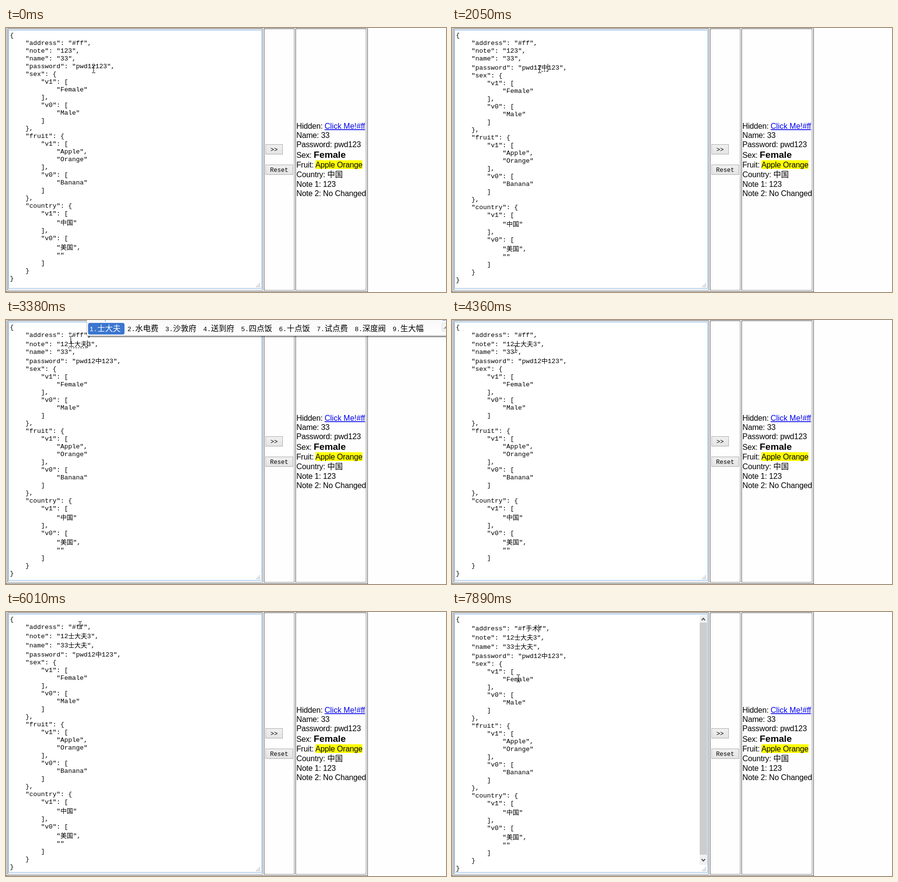
These frames come from a looping animation (906x545 px, 8 s). An HTML page:

```html
<!DOCTYPE html>
<html lang="en">
<head>
<meta charset="utf-8">
<title>JSON form editor</title>
<style>
  html, body { margin: 0; width: 100%; height: 100%; overflow: hidden; background: #fefefe; }
  svg { display: block; }
  text { white-space: pre; }
  .code { font: 13.333px "Liberation Mono", "Noto Sans CJK SC", monospace; }
  .wide { font-size: 13px; }
  .button { font: 12.5px "Liberation Mono", monospace; }
  .page { font: 16px "Liberation Sans", "Noto Sans CJK SC", sans-serif; letter-spacing: -.15px; }
  .large { font-size: 19.2px; font-weight: bold; letter-spacing: 0; }
  .link { fill: #00e; text-decoration: underline 1px; letter-spacing: 0; }
  .typed { font: bold 16px "Liberation Sans", sans-serif; }
  .word { font: 16px "Noto Sans CJK SC", sans-serif; }
</style>
</head>
<body>
<svg id="stage" width="906" height="545" viewBox="0 0 906 545">
  <defs>
    <linearGradient id="panel" x2="0" y2="1">
      <stop stop-color="#f5f5f5"/><stop offset="1" stop-color="#fff"/>
    </linearGradient>
    <linearGradient id="face" x2="0" y2="1">
      <stop stop-color="#f0f0f0"/><stop offset="1" stop-color="#e4e4e4"/>
    </linearGradient>
    <filter id="shadow" x="-5%" y="-20%" width="110%" height="150%">
      <feDropShadow dx="2" dy="2" stdDeviation="1" flood-opacity=".55"/>
    </filter>
  </defs>
  <g id="layout"></g>
  <g id="live"></g>
</svg>
<script>
const LOOP = 8000, BLINK = 560, CHAR = 8, WIDE = 13, LEFT = 8;
const DARK = '#4c4c4c', LIGHT = '#808080';

const SOURCE = `{
    "address": "#ff",
    "note": "123",
    "name": "33",
    "password": "pwd12123",
    "sex": {
        "v1": [
            "Female"
        ],
        "v0": [
            "Male"
        ]
    },
    "fruit": {
        "v1": [
            "Apple",
            "Orange"
        ],
        "v0": [
            "Banana"
        ]
    },
    "country": {
        "v1": [
            "中国"
        ],
        "v0": [
            "美国",
            ""
        ]
    }
}`.split('\n');

const S = '是 上 说 三 四 岁 时 手 少';
const SD = '速度 时代 收到 受到 感到 首都 视点 深度 山东';
const SDF = '士大夫 水电费 沙敦府 送到府 四点饭 十点饭 试点费 深度阀 生大幅';

// Each session types words through the input method at one place in the text.
const sessions = [
  { line: 4, col: 22, end: 2050, steps: [
    [1340, 'zh', '在 中 做 值 找 再 最 这 子'],
    [1490, 'zho', '中 中国 周 中午 中心 州 种 中文 重点'],
    [1620, 'zhong', '中 种 重 众 终 钟 忠 肿 仲']] },
  { line: 2, col: 15, end: 3790, steps: [[3110, 's', S], [3250, 'sd', SD], [3380, 'sdf', SDF]] },
  { line: 3, col: 15, end: 5320, steps: [[4590, 's', S], [4730, 'sd', SD], [4880, 'sdf', SDF]] },
  { line: 1, col: 18, end: 6770, steps: [
    [6290, 's', S],
    [6430, 'ss', '手术 实施 搜索 上述 叔叔 试试 时尚 设施 双手']] },
];

// start, end, steps, x, y
const moves = [
  [2050, 2990, 6, 133, 41],
  [3790, 4420, 4, 129, 64],
  [5320, 6010, 5, 152, 27],
  [6770, 7230, 3, 189, 161],
  [7230, 7890, 5, 136, 137],
];

const rect = (x, y, w, h, fill, extra = '') =>
  `<rect x="${x}" y="${y}" width="${w}" height="${h}" fill="${fill}" ${extra}/>`;
const text = (x, y, cls, str, extra = '') =>
  `<text x="${x}" y="${y}" class="${cls}" ${extra}>${str}</text>`;
const path = (d, stroke, width, extra = '') =>
  `<path d="${d}" fill="none" stroke="${stroke}" stroke-width="${width}" ${extra}/>`;
const codeLine = (y, str) =>
  text(LEFT, y, 'code', str.replace(/[^\x00-\x7f]+/g, '<tspan class="wide">$&</tspan>'));

const ruler = document.createElement('canvas').getContext('2d');
ruler.font = 'bold 16px "Liberation Sans", sans-serif';

function cell(left, right) {
  const w = right - left + 1;
  return rect(left, 541, w, 1, LIGHT) + rect(right, 1, 1, 541, LIGHT) +
    rect(left, 1, w, 1, DARK) + rect(left, 1, 1, 541, DARK);
}

function button(x, y, w, label) {
  return rect(x + .5, y + .5, w - 1, 20, 'url(#face)', 'stroke="#adadad"') +
    text(x + w / 2, y + 15, 'button', label, 'text-anchor="middle"');
}

function drawLayout() {
  let grip = '';
  for (let row = 0; row < 3; row++)
    for (let i = 0; i <= row; i++) grip += rect(521 - i * 3, 527 + row * 3, 2, 2, '#bcbcbc');
  const labels = [
    [208, 'Hidden: '], [227, 'Name: 33'], [246, 'Password: pwd123'], [268, 'Sex: '],
    [288, 'Fruit: '], [308, 'Country: 中国'], [328, 'Note 1: 123'], [347, 'Note 2: No Changed'],
  ];
  return rect(0, 0, 1, 545, LIGHT) + rect(744, 0, 1, 545, DARK) + rect(0, 544, 745, 1, DARK) +
    cell(3, 528) + cell(531, 593) + cell(596, 741) +
    rect(5.5, 4.5, 521, 533, '#fff', 'stroke="#7ab1e6"') + grip +
    button(534, 240, 36, '&gt;&gt;') + button(534, 282, 57, 'Reset') +
    rect(637, 273, 97, 18, '#ff0') +
    labels.map(([y, str]) => text(598, y, 'page', str)).join('') +
    text(656, 208, 'page link', 'Click Me!#ff') +
    text(633.5, 268, 'page large', 'Female') +
    text(637, 288, 'page', 'Apple Orange');
}

function drawPopup(x, y, typed, words) {
  const spacing = typed.startsWith('zh') ? 0 : 2;
  const typedEnd = x + 8 + ruler.measureText(typed).width + spacing * typed.length;
  let items = '', at = x + 6;
  words.forEach((word, i) => {
    const width = 16 + 16 * word.length, fill = `fill="${i ? '#000' : '#fff'}"`;
    if (!i) items += rect(at - 3, y + 24, width + 11, 24, '#3b76cf', 'rx="4"');
    items += text(at, y + 41, 'code', `${i + 1}.`, fill) + text(at + 16, y + 41, 'word', word, fill);
    at += width + 14;
  });
  const right = at + 72;
  const arrow = (left, dir, color) => {
    const cx = left + 11, cy = y + 33;
    return rect(left + .5, y + 24.5, 21, 17, '#f3f3f3', 'stroke="#ddd" rx="2"') +
      `<path d="M${cx - 8} ${cy - 4 * dir}L${cx} ${cy + 4 * dir}L${cx + 8} ${cy - 4 * dir}L${cx} ${cy - dir}Z" fill="${color}"/>`;
  };
  return rect(x + .5, y + .5, right - x - 2, 50, 'url(#panel)', 'stroke="#c4c4c4" filter="url(#shadow)"') +
    text(x + 8, y + 18, 'typed', typed, `letter-spacing="${spacing}"`) +
    rect(Math.round(typedEnd), y + 3, 1, 19, '#5a9bd0') +
    `<circle cx="${right - 44}" cy="${y + 11}" r="8" fill="#3b6fd8"/>` + items +
    arrow(right - 49, -1, '#8a8a8a') + arrow(right - 26, 1, '#2468cf');
}

function drawScrollbar() {
  return rect(510, 6, 16, 516, '#f0f0f0') + rect(510, 22, 15, 479, '#cdcdcd') +
    path('M514 17l3.5-4 3.5 4M514 510l3.5 4 3.5-4', '#505050', 2);
}

function drawMouse(t) {
  let x = 180, y = 85;
  for (const [start, end, steps, toX, toY] of moves) {
    if (t < start) break;
    const p = Math.min(1, Math.floor((t - start) / (end - start) * steps + 1e-6) / steps);
    const ease = p * p * (3 - 2 * p);
    x += (toX - x) * ease;
    y += (toY - y) * ease;
  }
  x = Math.round(x);
  y = Math.round(y);
  return path(`M${x - 3} ${y - 7.5}h3m1 0h3M${x + .5} ${y - 7}v14M${x - 3} ${y + 7.5}h3m1 0h3`, '#000', 1);
}

function drawLive(t) {
  const lines = [...SOURCE];
  let active, step, word = '';
  for (const session of sessions) {
    const current = session.steps.filter(([start]) => t >= start).pop();
    if (!current) break;
    active = session;
    step = current;
    word = current[2].split(' ')[0];
    const { line, col } = session;
    lines[line] = lines[line].slice(0, col) + word + lines[line].slice(col);
  }

  // Lines with wide characters are taller.
  let y = 3;
  const baselines = lines.map(line => y += /[^\x00-\x7f]/.test(line) ? 19 : 16);
  let out = lines.map((line, i) => codeLine(baselines[i], line)).join('');
  if (t >= 6290) out += drawScrollbar();

  const caret = (x, base) => rect(x, base - 12, 1, 16, '#000');
  if (active) {
    const base = baselines[active.line];
    const from = LEFT + active.col * CHAR, to = from + word.length * WIDE;
    if (t < active.end + 150)
      out += path(`M${from} ${base + 3.5}H${to}`, '#000', 1, 'stroke-dasharray="3 2"');
    if (t < active.end || Math.floor((t - active.end) / BLINK) % 2 === 0) out += caret(to, base);
    if (t < active.end) out += drawPopup(to - 1, base - 72, step[1], step[2].split(' '));
  } else if (t >= 120 && t < 120 + BLINK) {
    out += caret(184, baselines[4]);
  }
  return out + drawMouse(t);
}

const live = document.getElementById('live');
document.getElementById('layout').innerHTML = drawLayout();
const origin = performance.now();
let shown = '';
function frame() {
  const markup = drawLive((performance.now() - origin) % LOOP);
  if (markup !== shown) live.innerHTML = shown = markup;
  requestAnimationFrame(frame);
}
frame();
</script>
</body>
</html>
```
